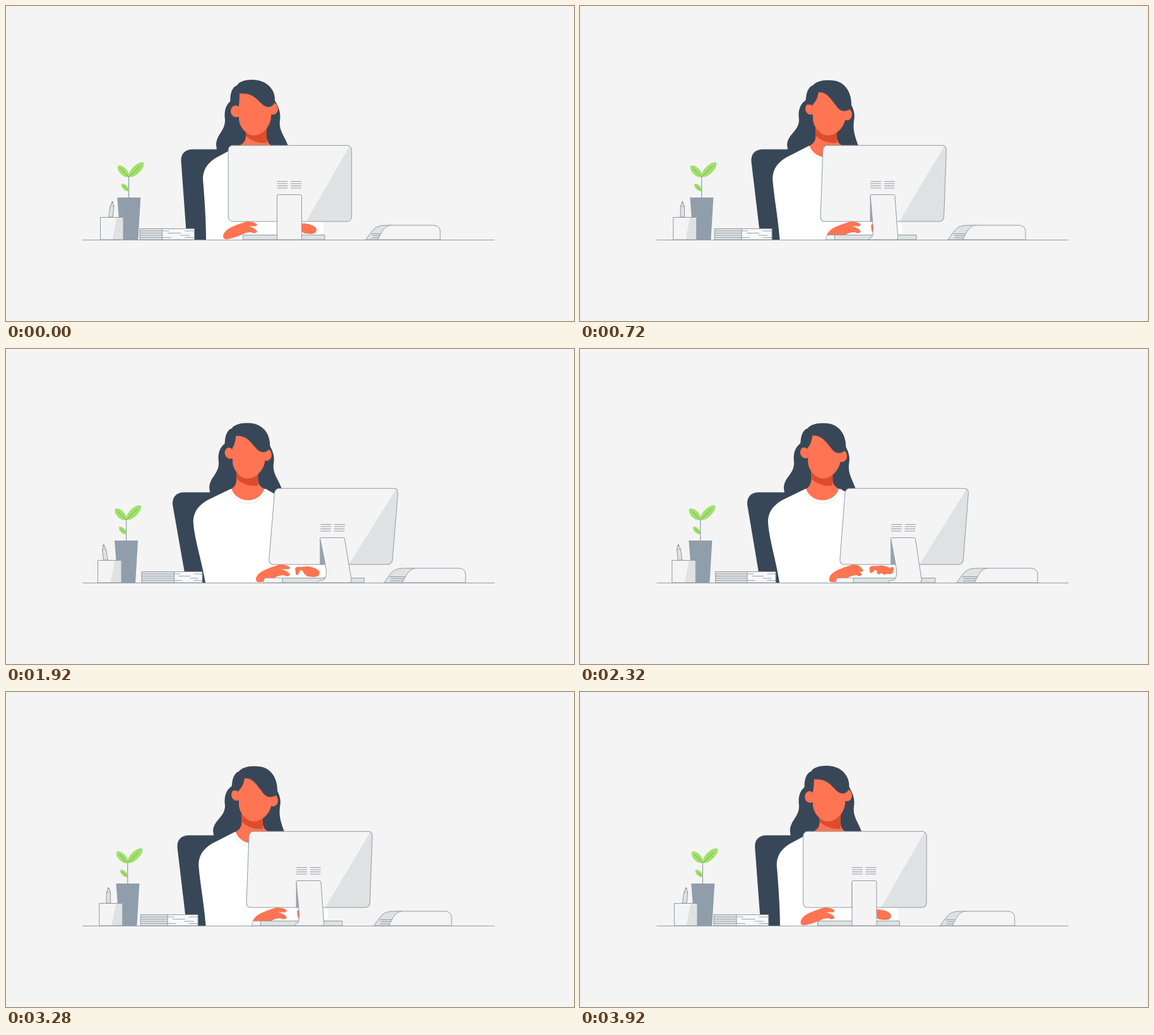
These frames come from a looping animation (900x500 px, 4000 ms). An HTML page with a canvas:

```html
<!DOCTYPE html>
<html lang="en">
<head>
<meta charset="utf-8">
<title>Desk work</title>
<style>
html, body { margin: 0; width: 900px; height: 500px; overflow: hidden; background: #f4f4f4; }
canvas { display: block; }
</style>
</head>
<body>
<canvas id="stage" width="900" height="500"></canvas>
<script>
const ctx = document.getElementById('stage').getContext('2d');
const LOOP = 4000, STEP = 80;
const PAPER = '#f4f4f4', SHADE = '#dfe2e2', LINE = '#8f9aa5', POT = '#909eab',
      HAIR = '#384757', SKIN = '#ff7452', SKIN_DARK = '#de4c2c', LEAF = '#a1e16a';

// Smooth interpolation through [position, value] pairs.
function track(keys) {
  const slope = i => {
    const a = keys[Math.max(0, i - 1)], b = keys[Math.min(keys.length - 1, i + 1)];
    return (b[1] - a[1]) / (b[0] - a[0]);
  };
  return x => {
    let i = 0;
    while (i < keys.length - 2 && x > keys[i + 1][0]) i++;
    const [x0, y0] = keys[i], [x1, y1] = keys[i + 1];
    const w = x1 - x0, s = (x - x0) / w, s2 = s * s, s3 = s2 * s;
    return y0 + (y1 - y0) * (3 * s2 - 2 * s3)
      + w * (slope(i) * (s3 - 2 * s2 + s) + slope(i + 1) * (s3 - s2));
  };
}
const poses = (...v) => track([0, .36, .68, .96, 1].map((x, i) => [x, v[i]]));

const orbit = track([[0, 0], [.04, .02], [.28, .31], [.36, .44], [.56, .7], [.68, .8], [.84, .91], [.96, .985], [1, 1]]);
const faceX = poses(369, 369, 364, 359, 358.6);
const headTurn = poses(0, 1, 1, .55, .5);
const hairRight = poses(447, 441, 437, 437, 437);
const leftHandX = poses(344, 391, 393, 396, 396);
const rightHandX = poses(453, 461, 459, 458, 458);
const sleeveX = poses(504, 511, 500, 508, 508);
const handCurl = poses(0, 0, 1, 0, 0);

function shape(d, fill, stroke, width = 1) {
  const path = new Path2D(d);
  if (fill) { ctx.fillStyle = fill; ctx.fill(path); }
  if (stroke) { ctx.strokeStyle = stroke; ctx.lineWidth = width; ctx.stroke(path); }
}
function disc(x, y, rx, ry, fill) {
  ctx.fillStyle = fill;
  ctx.beginPath();
  ctx.ellipse(x, y, rx, ry, 0, 0, Math.PI * 2);
  ctx.fill();
}
const rule = (x0, x1, y, width) => shape(`M${x0} ${y}H${x1}`, null, LINE, width);

function leaf(x, y, tipX, tipY, fat) {
  const dx = tipX - x, dy = tipY - y, nx = -dy * fat, ny = dx * fat;
  const near = s => `${x + dx * .1 + nx * s} ${y + dy * .1 + ny * s}`;
  const far = s => `${x + dx * .9 + nx * s} ${y + dy * .9 + ny * s}`;
  shape(`M${x} ${y}C${near(1)} ${far(1)} ${tipX} ${tipY}C${far(-1)} ${near(-1)} ${x} ${y}Z`, LEAF);
  shape(`M${x} ${y}L${x + dx * .75} ${y + dy * .75}`, null, '#6f9c6b', .9);
}

function drawPlant(p) {
  const x = 176.3 - 4.3 * p, stem = 194.5 - 4 * p;
  shape(`M${stem} 304V270`, null, LINE, 1.2);
  leaf(stem - .5, 271, stem - 17 - p * .5, 253.5, .32);
  leaf(stem + .5, 271, stem + 23.5 - p * .5, 248.5, .26);
  leaf(stem, 293.5, stem - 11.5, 282.5, .31);
  shape(`M${x} 304H${x + 37}L${x + 33} 371H${x + 5}Z`, POT);
}

function drawCup(p) {
  const x = 149.5 - 4 * p, right = 186 - 3 * p;
  const base = 162.5 - 8 * p, shoulder = 165 - 12.7 * p, tip = 168.5 - 14 * p;
  shape(`M${base} 335L${shoulder} 318L${tip} 310L${shoulder + 6} 318L${base + 6.7} 335Z`, SHADE, LINE);
  shape(`M${shoulder} 318H${shoulder + 6}`, null, LINE, .8);
  shape(`M${tip - 1} 312.5L${tip} 310L${tip + 1} 312.5Z`, '#68788a');
  shape(`M${x} 335.5H${right}V371H${x}Z`, PAPER);
  shape(`M${right - 10.5} 335.5H${right}V371H${right - 17.5}Z`, SHADE);
  shape(`M${x} 335.5H${right}V371H${x}Z`, null, LINE);
}

function drawBooks(p) {
  const x = 212 + 3 * p, fold = 247.5 + 19.3 * p, right = 298.5 + 12.7 * p;
  shape(`M${x} 353.5H${right}V371H${x}Z`, '#f7f8f8');
  shape(`M${x} 353.5H${fold}V371H${x}Z`, SHADE);
  for (const y of [357, 360.5, 364, 367.5]) rule(x, fold, y, .9);
  const w = right - fold;
  [[0, .22, 357], [.7, 1, 357], [.16, .58, 360.5], [.55, .86, 364], [0, .28, 367.5], [.7, 1, 367.5]]
    .forEach(([a, b, y]) => rule(fold + w * a, fold + w * b, y, .9));
  shape(`M${x} 353.5H${right}V371H${x}ZM${fold} 353.5V371`, null, LINE);
}

function drawChair(p) {
  const x = 277.5 - 13.7 * p;
  shape(`M${x + 9 + 13 * p} 371L${x} 247C${x - 1} 234 ${x + 7} 227.5 ${x + 18} 227.5H370V371Z`, HAIR);
}

function drawWoman(u, p) {
  const f = faceX(u), k = headTurn(u), hl = 333 - 11 * p, hr = hairRight(u);
  const sx = 312.3 - 15.5 * p, cx = 396 - 12 * p, nl = 380 - 15 * p, nr = 413 - 14 * p;

  shape(`M${f + 10} 128L${f - 12} 150C${f - 23} 158 ${f - 23} 171 ${f - 22} 179
    C${f - 21} 199 ${hl} 203 ${hl} 221L${hl + 1} 228L${hl + 20} 242H${hr}V222
    C${hr - 5} 207 ${f + 63} 198 ${f + 65} 182C${f + 67 + k} 170 ${f + 63} 160 ${f + 57} 150Z`, HAIR);

  shape(`M${cx - 28} 222L${sx + 25} 238.5C${sx + 6} 248 ${sx - 1.5} 262 ${sx} 278
    C${sx + 2} 303 ${317 - 6 * p} 340 ${317 - p} 371H480V342L${cx + 60} 240L${cx + 27} 222Z`, '#fff');
  const sleeve = sleeveX(u);
  shape(`M470 335H${sleeve - 10}Q${sleeve} 345 ${sleeve} 354Q${sleeve} 362 ${sleeve - 8} 363H470Z`, '#fff');

  shape(`M${nl} 185V207Q${nl} 217 ${cx - 27} 222C${cx - 18} 246 ${cx + 17} 246 ${cx + 25} 222Q${nr} 217 ${nr} 207V185Z`, SKIN);
  shape(`M${nl} 185V206Q${nl + 14} 219 ${nr} 217V185Z`, SKIN_DARK);
  shape(`M${cx - 30} 223C${cx - 20} 253 ${cx + 19} 253 ${cx + 29} 222`, null, '#dcdfe3', .8);

  disc(f - 4 + k, 167 - 4 * k, 9, 9.5, SKIN);
  disc(f + 54, 163 + 9 * k, 8, 9.5, SKIN);
  shape(`M${f} 135V178C${f} 192 ${f + 12} 205.5 ${f + 24} 205.5C${f + 38} 205.5 ${f + 51 + k} 190 ${f + 51 + k} 175L${f + 54} 135Z`, SKIN);
  shape(`M${f} ${158 - 2 * k}Q${f + 1 + 6 * k} 150 ${f + 1 + 8 * k} ${139 - 2 * k}
    C${f + 20 + 2 * k} ${137 - k} ${f + 28} 147 ${f + 36} ${155 + 2 * k}
    C${f + 43} ${162 + 7 * k} ${f + 53} ${163 + 6 * k} ${f + 57 + 4 * k} ${152 + 10 * k}
    C${f + 59 + 4 * k} 132 ${f + 43 + 3 * k} 117 ${f + 21 + 6 * k} ${117 + k}
    C${f + 10 + 6 * k} 117 ${f + 5 * k} 120 ${f - 3 + 3 * k} 126
    C${f - 12 + 3 * k} 129 ${f - 15 + 3 * k} 143 ${f - 13 + 2 * k} 157
    Q${f - 6} 155 ${f} ${160 - 2 * k}Z`, HAIR);
}

function drawHands(u) {
  const x = leftHandX(u), r = rightHandX(u), c = handCurl(u);
  shape(`M${x} 366C${x + 1} 355 ${x + 14} 350 ${x + 30} 344.5L${x + 38} 342
    C${x + 45} 342 ${x + 51} ${343.5 + 3 * c} ${x + 54} ${347 + 8 * c}Q${x + 53} ${350.5 + 8 * c} ${x + 48} ${349.5 + 8 * c}L${x + 40} ${349.5 + 3 * c}
    Q${x + 51 - 3 * c} 352 ${x + 54 - 4 * c} 358Q${x + 51 - 4 * c} 363 ${x + 44} 359L${x + 36} 360Q${x + 25} 366 ${x + 8} 370Q${x} 371 ${x} 366Z`, SKIN);

  const low = 362 - 9 * c, top = 345 - 3 * c;
  shape(`M${r} 348Q${r + 2} ${top} ${r + 8} ${top + 1}L${r + 20} ${top}Q${r + 36 - 2 * c} ${347 - 3 * c} ${r + 39 - 2 * c} 354
    Q${r + 40 - 2 * c} ${low - 1} ${r + 30} ${low}L${r + 20} ${low - 1}Q${r + 14} ${358 - 5 * c} ${r + 12} 352
    L${r + 8} 351L${r + 5} ${358 - 6 * c}Q${r + 2} ${361 - 8 * c} ${r + 1} ${356 - 4 * c}Z`, SKIN);
  if (c > 0) {
    ctx.lineCap = 'round';
    for (const [dx, y] of [[15, 360], [24, 361], [33, 359]])
      shape(`M${r + dx + 3} 349L${r + dx} ${349 + (y - 349) * c}`, null, SKIN, 6);
    ctx.lineCap = 'butt';
  }
}

function drawMonitor(p) {
  const baseX = 375.5 + 63.5 * p, baseTip = 375.5 + 32 * p;
  shape(`M${baseTip + 3 * p} 363.5H${baseX + 2}V371H${baseTip}Z`, PAPER, LINE, .8);
  shape(`M${baseX} 363.5H${baseX + 129.5}V371H${baseX}Z`, SHADE, LINE);

  // The screen leans more to the right as the view turns.
  ctx.save();
  ctx.transform(1, 0, -10 * p / 121, 1, 352.2 + 65 * p + 10 * p * 342 / 121, 0);
  const screen = new Path2D();
  screen.roundRect(0, 221.3, 195.5, 120.7, 7);
  ctx.save();
  ctx.clip(screen);
  ctx.fillStyle = PAPER;
  ctx.fillRect(0, 221, 200, 122);
  shape(`M193 221H200V343H${123 + 3.5 * p}Z`, SHADE);
  ctx.restore();
  ctx.strokeStyle = LINE;
  ctx.lineWidth = 1;
  ctx.stroke(screen);
  for (const y of [278.5, 282, 285.5, 289]) {
    rule(77.3, 94, y);
    rule(99, 115.7, y);
  }
  ctx.restore();

  const x = 429.5 + 69.2 * p, right = 468.5 + 80 * p;
  shape(`M${x} 301V342H${x + 9 * p}Z`, '#98a4af', LINE, .6);
  shape(`M${x + 1} 299.5H${x + 37}Q${x + 39} 299.5 ${x + 39} 302L${right} 366Q${right} 371 ${right - 6 * p} 371H${x - 4 * p}
    Q${x - 5 * p} 367 ${x + 4 * p} 367Q${x + 11 * p} 366 ${x + 10 * p} 350L${x} 301Z`, PAPER, LINE);
}

function drawPapers(p) {
  const side = 570 + 29.3 * p, front = 589 + 39.5 * p, right = 688 + 40.8 * p;
  shape(`M${side} 371L${side + 8} 360C${side + 14} 351 ${side + 20} 348 ${side + 33} 348H${front + 22}L${front} 371Z`, SHADE, LINE);
  rule(side + 9, front + 5, 361.5);
  rule(side + 11, front + 3, 364.5);
  rule(side + 10, front + 2, 368);
  shape(`M${front} 371C${front + 6} 360 ${front + 10} 348 ${front + 22} 348H${right - 10}Q${right} 349 ${right} 358V371Z`, PAPER, LINE);
}

function draw() {
  const t = Math.floor(performance.now() % LOOP / STEP) * STEP;
  const u = 1 - Math.abs(t / (LOOP / 2) - 1), p = orbit(u);
  ctx.fillStyle = PAPER;
  ctx.fillRect(0, 0, 900, 500);
  drawChair(p);
  drawWoman(u, p);
  drawHands(u);
  drawPlant(p);
  drawCup(p);
  drawBooks(p);
  drawMonitor(p);
  drawPapers(p);
  rule(121.5, 774, 371.4);
  requestAnimationFrame(draw);
}
draw();
</script>
</body>
</html>
```
